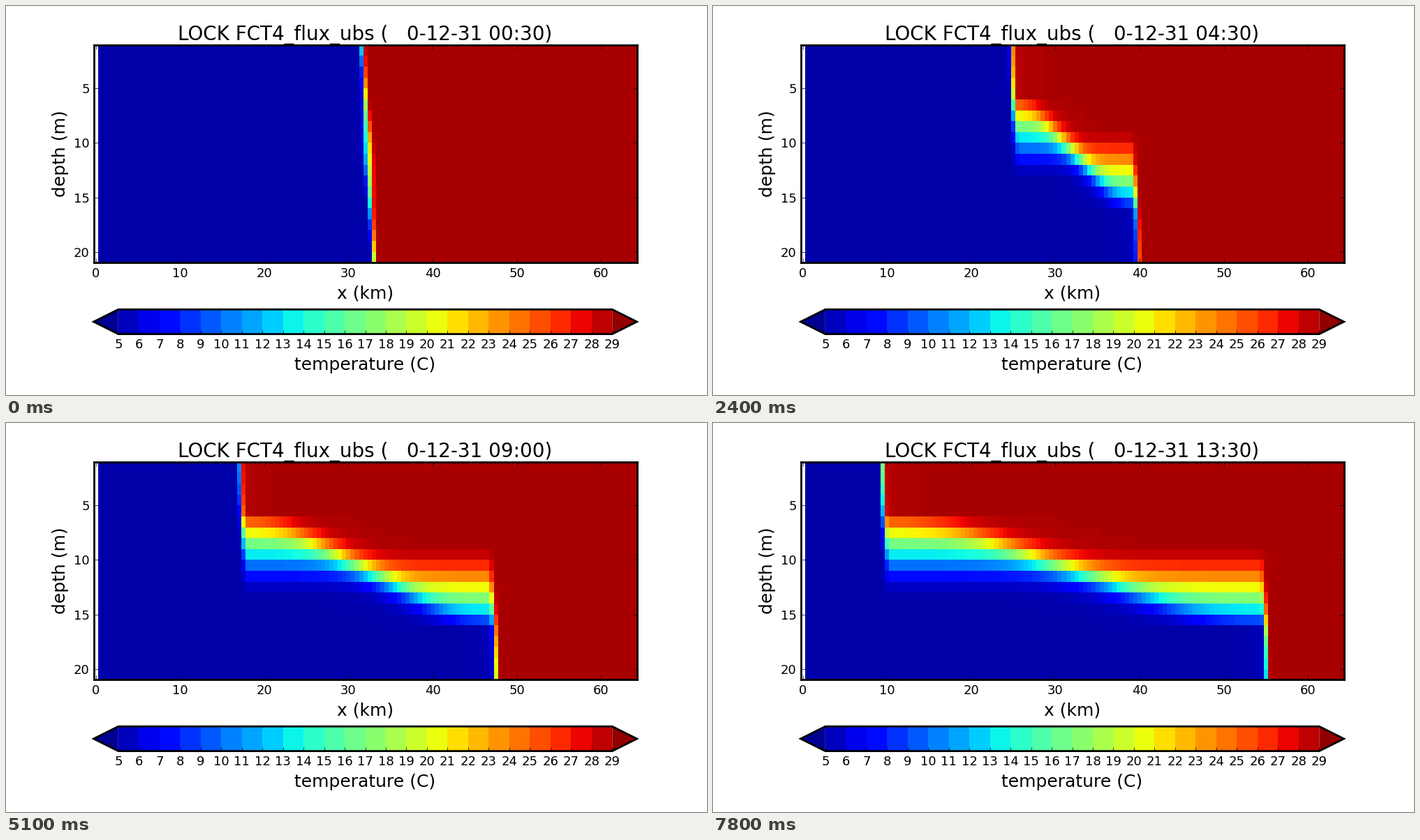
These frames come from a looping animation (1004 by 558 pixels, 8 s). A matplotlib script:

```python
import numpy as np
import matplotlib.pyplot as plt
from matplotlib.animation import FuncAnimation
from matplotlib.colors import Normalize
from matplotlib.patches import Polygon

W, H, DPI = 1004, 558, 128
COLD, WARM = 5.0, 29.0
NX, NZ, SUB = 128, 20, 8
STEP_MS, TICK_MS, LOOP_MS = 300, 100, 8000
LEFT, WIDTH = 0.125, 0.775


def pt(px):
    return px * 72 / DPI


plt.rcParams.update({
    "font.family": "DejaVu Sans",
    "axes.linewidth": pt(2.8),
    "xtick.direction": "in",
    "ytick.direction": "in",
})

z = np.arange(1, NZ + 1)[:, None]
x = 0.25 + (np.arange(NX * SUB) + 0.5) * 0.5 / SUB

# Warm fraction by depth behind each front; one mirrors the other
behind_left = np.clip((12.5 - z) / 7.5, 0, 1) ** 1.4
behind_right = 1 - behind_left[::-1]

# Rows of the front lag with depth and leave a weak fringe near the surface
lag = 0.45 * np.clip((z - 1) / 9, 0, 1) ** 1.6
fringe = np.where(z <= 5, 0.03, 0)

# Tilted interface just after the lock opens
tilt = 32.28 + 0.0705 * (z - 10.5)
tilt_width = 0.5 + 0.9 * np.sin(np.pi * (z - 1) / 19) ** 4


def ramp(d, width=0.5):
    return np.clip(d / width + 0.5, 0, 1)


def temperature(t):
    """Cell-mean temperature after t hours."""
    left, right = 32.47 - 1.702 * t, 32.11 + 1.703 * t
    s = (2 * x - left - right) / (right - left)
    mix = 1 / (1 + np.exp(-(s - 0.145 * (z - 10.5)) / 0.1))
    warm = behind_left + (behind_right - behind_left) * mix
    warm -= fringe * np.exp(-np.maximum(x - left, 0))
    warm += fringe[::-1] * np.exp(-np.maximum(right - x, 0))
    warm *= ramp(x - left - lag)
    warm = 1 - (1 - warm) * ramp(right - lag[::-1] - x)

    early = np.clip((2 - t) / 1.5, 0, 1)
    warm += early * (ramp(x - tilt, tilt_width) - warm)
    return COLD + (WARM - COLD) * warm.reshape(NZ, NX, SUB).mean(axis=2)


cmap, norm = plt.get_cmap("jet"), Normalize(4, 30)
fig = plt.figure(figsize=(W / DPI, H / DPI), dpi=DPI, facecolor="white")

ax = fig.add_axes([LEFT, 0.34, WIDTH, 0.56])
mesh = ax.pcolormesh(0.25 + 0.5 * np.arange(NX + 1), np.arange(1, NZ + 2),
                     temperature(0.5), cmap=cmap, norm=norm)
ax.set_xlim(-0.25, 64.25)
ax.set_ylim(21, 1)
ax.set_xticks(range(0, 61, 10))
ax.set_yticks(range(5, 21, 5))
ax.tick_params(top=True, right=True, length=pt(5.6), width=pt(0.7), labelsize=pt(18))
ax.tick_params(axis="x", pad=pt(6.7))
ax.tick_params(axis="y", pad=pt(5.9))
title = ax.set_title("", fontsize=pt(27.8), y=1.0, pad=pt(6.9))

# Colour bar with pointed ends
bar_h = WIDTH * W / 1.1 / 20 / H
bar = fig.add_axes([LEFT, 0.22 - bar_h, WIDTH, bar_h])
bar.set_xlim(3.8, 30.2)
bar.set_ylim(0, 1)
bar.patch.set_visible(False)
bar.spines[:].set_visible(False)
bar.pcolormesh(np.arange(5, 30), [0, 1], [np.arange(5.5, 29)], cmap=cmap, norm=norm)
for base, tip, value in ((5, 3.8, 4.5), (29, 30.2, 29.5)):
    bar.add_patch(Polygon([(base, 0), (tip, 0.5), (base, 1)], lw=0,
                          fc=cmap(norm(value))))
bar.add_patch(Polygon([(3.8, 0.5), (5, 1), (29, 1), (30.2, 0.5), (29, 0), (5, 0)],
                      fill=False, ec="black", lw=pt(2.8), joinstyle="miter",
                      clip_on=False, zorder=3))
bar.set_yticks([])
bar.set_xticks(range(5, 30))
bar.tick_params(axis="x", length=pt(5.6), width=pt(0.7), pad=pt(6.7), labelsize=pt(18))


def label(px, py, text, **kw):
    fig.text(px / W, 1 - py / H, text, fontsize=pt(25), ha="center",
             va="baseline", **kw)


label(514.5, 419.3, "x (km)")
label(514.5, 521.6, "temperature (C)")
label(85, 212, "depth (m)", rotation=90, rotation_mode="anchor")


def update(i):
    minutes = 30 * (i * TICK_MS // STEP_MS + 1)
    hours, rest = divmod(minutes, 60)
    mesh.set_array(temperature(minutes / 60))
    title.set_text(f"LOCK FCT4_flux_ubs (   0-12-31 {hours:02d}:{rest:02d})")
    return mesh, title


anim = FuncAnimation(fig, update, frames=LOOP_MS // TICK_MS, interval=TICK_MS,
                     repeat=True)
plt.show()
```
